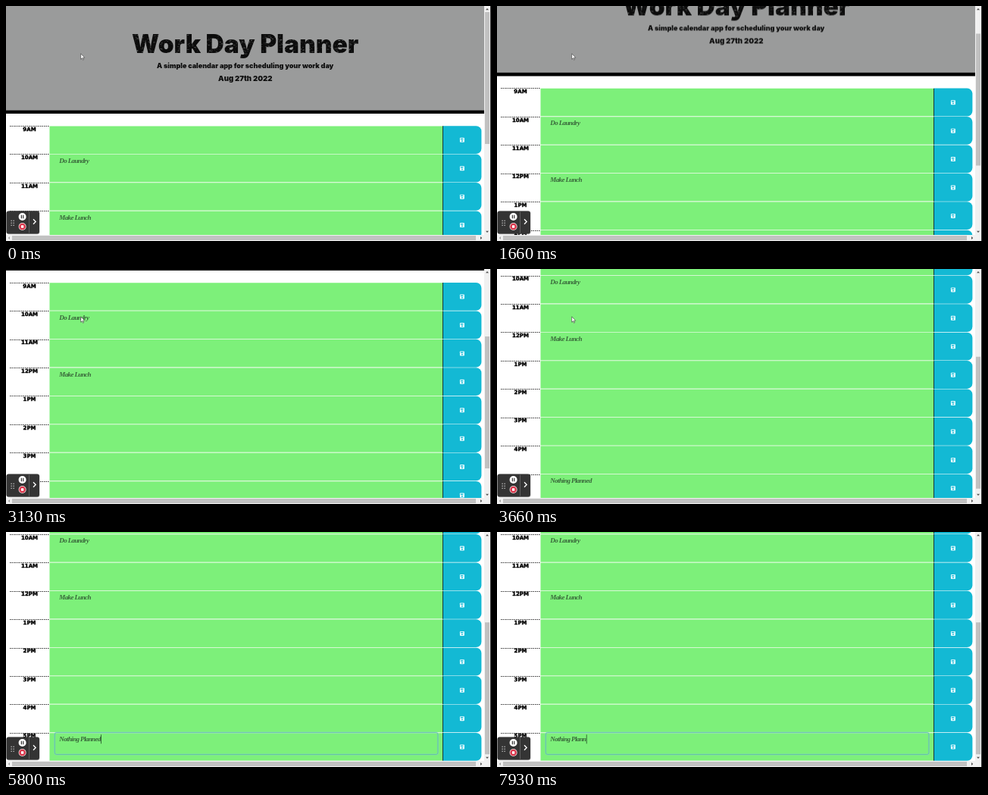
These frames come from a looping animation (640 by 310 pixels, 8000 ms). An HTML page with a canvas:

```html
<!DOCTYPE html>
<html lang="en">
<head>
<meta charset="utf-8">
<title>Day planner</title>
<style>
html, body { margin: 0; width: 100%; height: 100%; overflow: hidden; background: #fff; }
canvas { display: block; width: 640px; height: 310px; }
</style>
</head>
<body>
<canvas id="stage"></canvas>
<script>
const W = 640, H = 310, LOOP = 8000;
const VIEW_W = 631, VIEW_H = 302;
const ROW_TOP = 158, ROW_H = 37.42, MAX_SCROLL = 192.6;
const HOURS = ['9AM', '10AM', '11AM', '12PM', '1PM', '2PM', '3PM', '4PM', '5PM'];
const HEAVY = '900 SIZEpx Inter, Roboto, sans-serif';
const SCRIPT = 'italic bold 9px "Liberation Serif", "Noto Serif", serif';

const scale = Math.max(1, window.devicePixelRatio || 1);
const stage = document.getElementById('stage');
stage.width = W * scale;
stage.height = H * scale;
const ctx = stage.getContext('2d');

const clamp = x => Math.max(0, Math.min(1, x));
const smooth = x => x * x * (3 - 2 * x);
const ramp = (t, start, length) => smooth(clamp((t - start) / length));

// Wheel ticks: [start time, scroll offset after the tick]
const TICKS = [[425, 46.7], [1630, 93.6], [2240, 140.2], [3370, 186.8], [3800, MAX_SCROLL]];

function scrollAt(t) {
  let y = 0;
  for (const [start, end] of TICKS) y += (end - y) * ramp(t, start, 205);
  return y;
}

function box(x, y, w, h, color, radius = 0, c = ctx) {
  c.fillStyle = color;
  c.beginPath();
  c.roundRect(x, y, w, h, radius);
  c.fill();
}

function line(points, color, width = 1) {
  ctx.strokeStyle = color;
  ctx.lineWidth = width;
  ctx.beginPath();
  points.forEach(([x, y]) => ctx.lineTo(x, y));
  ctx.stroke();
}

function shape(points, color) {
  ctx.fillStyle = color;
  ctx.beginPath();
  points.forEach(([x, y]) => ctx.lineTo(x, y));
  ctx.fill();
}

function dot(x, y, r, color) {
  ctx.fillStyle = color;
  ctx.beginPath();
  ctx.arc(x, y, r, 0, Math.PI * 2);
  ctx.fill();
}

function seeded(seed) {
  return () => (seed = (seed * 16807) % 2147483647) / 2147483647;
}

// Heading letters with worn streaks, prepared once
function makeHeading() {
  const layer = document.createElement('canvas');
  layer.width = W * scale;
  layer.height = 120 * scale;
  const c = layer.getContext('2d');
  c.scale(scale, scale);
  c.textAlign = 'center';
  c.fillStyle = '#0c0c0c';
  const write = (text, size, y, spacing) => {
    c.font = HEAVY.replace('SIZE', size);
    c.letterSpacing = spacing + 'px';
    c.fillText(text, 315.7 + spacing / 2, y);
  };
  write('Work Day Planner', 33.5, 61.7, 0);
  write('A simple calendar app for scheduling your work day', 9, 82, 0);
  write('Aug 27th 2022', 9.6, 99, 0);

  c.globalCompositeOperation = 'source-atop';
  const rnd = seeded(71);
  for (let i = 0; i < 1100; i++) {
    const x = 160 + rnd() * 312, y = 36 + rnd() * 34;
    c.fillStyle = `rgba(150,152,151,${0.15 + rnd() * 0.5})`;
    c.fillRect(x, y, 0.5 + rnd() * 2.2, 0.3 + rnd() * 0.6);
  }
  for (let i = 0; i < 500; i++) {
    c.fillStyle = `rgba(150,152,151,${0.1 + rnd() * 0.35})`;
    c.fillRect(188 + rnd() * 256, 74 + rnd() * 28, 0.5 + rnd() * 1.5, 0.4);
  }
  return layer;
}
const heading = makeHeading();

function drawHeader(scroll) {
  box(0, -scroll, VIEW_W, 137.4, '#9a9b9b');
  box(0, 137.4 - scroll, VIEW_W, 4.7, '#000');
  ctx.drawImage(heading, 0, -scroll, W, 120);
}

function saveIcon(x, y) {
  box(x - 3, y - 3, 6, 6, '#e9fbff', 0.8);
  box(x - 2, y - 2, 3.4, 1.4, '#13b9d4');
  dot(x, y + 1.2, 0.95, '#13b9d4');
}

function drawRow(hour, i, y) {
  box(57.5, y + 0.4, 519, ROW_H - 0.9, '#7df07a');
  box(57.5, y + ROW_H - 0.5, 519, 0.9, '#d5f8d3');
  box(576.8, y + 0.2, 50.6, ROW_H - 0.6, '#13b9d4', [0, 7, 7, 0]);
  box(576, y + 0.3, 1, ROW_H - 0.7, '#17343a');
  saveIcon(601.9, y + 18.8);

  ctx.setLineDash([1.5, 1]);
  const edge = Math.round(y) + 0.5;
  line([[5, edge], [57.5, edge]], '#222', 0.9);
  ctx.setLineDash([]);

  ctx.font = 'bold 7px "DejaVu Sans", sans-serif';
  ctx.textAlign = 'center';
  ctx.fillStyle = ctx.strokeStyle = '#000';
  ctx.lineWidth = 0.4;
  ctx.fillText(hour, 31, y + 6.7);
  ctx.strokeText(hour, 31, y + 6.7);
}

function drawNote(text, y) {
  ctx.font = SCRIPT;
  ctx.textAlign = 'left';
  ctx.letterSpacing = '-0.62px';
  ctx.fillStyle = '#38663a';
  ctx.fillText(text, 70.3, y + 11.6);
  const width = ctx.measureText(text).width;
  ctx.letterSpacing = '0px';
  return width;
}

const FOCUS = 5600;

function drawPlanner(t, scroll) {
  const top = i => ROW_TOP + i * ROW_H - scroll;
  HOURS.forEach((hour, i) => drawRow(hour, i, top(i)));
  drawNote('Do Laundry', top(1));
  drawNote('Make Lunch', top(3));

  const removed = t < 7660 ? 0 : t < 7860 ? 1 : 2;
  const note = 'Nothing Planned';
  const y = top(8);
  if (t >= FOCUS) {
    ctx.strokeStyle = 'rgba(125,205,225,0.45)';
    ctx.lineWidth = 2;
    ctx.beginPath();
    ctx.roundRect(64.3, y - 0.2, 505.6, 28.9, 2.5);
    ctx.stroke();
    ctx.strokeStyle = '#62b9a8';
    ctx.lineWidth = 0.8;
    ctx.stroke();
  }
  const width = drawNote(note.slice(0, note.length - removed), y);
  const blinkOff = t > 6860 && t < 7260;
  if (t >= FOCUS && !blinkOff) box(70.6 + width, y + 2.6, 0.8, 12, '#234d28');
}

function drawScrollbars(scroll) {
  const gray = '#505050', thumb = '#c1c1c1';
  box(VIEW_W, 0, 8, H, '#f1f1f1');
  box(0, VIEW_H, 639, 8, '#f1f1f1');
  box(632, 8 + scroll * 0.577, 6, 174, thumb);
  box(8, 303, 612, 6, thumb);
  shape([[633, 5.2], [635, 3], [637, 5.2]], gray);
  shape([[633, 296.7], [635, 298.9], [637, 296.7]], gray);
  shape([[5, 304], [2.8, 306], [5, 308]], '#a3a3a3');
  shape([[626, 304], [628.2, 306], [626, 308]], gray);
  box(639, 0, 1, H, '#2b2b2b');
}

function drawRecorder() {
  box(0.5, 270.6, 44, 30.6, 'rgba(0,0,0,0.25)', 3);
  box(0.5, 270.6, 43.5, 29.8, '#343434', 3);
  for (let i = 0; i < 6; i++) {
    dot(7.1 + (i % 2) * 3, 283.3 + (i >> 1) * 3, 0.75, '#d0d0d0');
  }
  dot(21.6, 278, 5, '#fff');
  box(19.8, 275.8, 1.2, 4.4, '#333');
  box(22.2, 275.8, 1.2, 4.4, '#333');
  dot(21.6, 291, 5, '#f3e3e3');
  dot(21.6, 291, 4.3, '#d9344a');
  box(19.9, 289.3, 3.4, 3.4, '#fff', 0.5);
  box(30.2, 271.5, 0.8, 28, '#6a6a6a');
  line([[36, 281.2], [39.2, 284.5], [36, 287.8]], '#fff', 1.3);
}

function drawPointer(t) {
  if (t >= FOCUS) return;
  const move = ramp(t, 4150, 600);
  ctx.save();
  ctx.translate(98.7 + 48 * move, 62.8 + 211.2 * move);
  const arrow = [[0, 0], [0, 7.4], [1.7, 5.9], [2.8, 8.4], [3.9, 7.9], [2.8, 5.5], [5, 5.4], [0, 0]];
  shape(arrow, '#fff');
  line(arrow, '#333', 0.6);
  ctx.restore();
}

function draw(t) {
  const scroll = scrollAt(t);
  ctx.setTransform(scale, 0, 0, scale, 0, 0);
  box(0, 0, W, H, '#fff');
  drawHeader(scroll);
  drawPlanner(t, scroll);
  drawScrollbars(scroll);
  drawRecorder();
  drawPointer(t);
}

const begin = performance.now();
function tick() {
  draw((performance.now() - begin) % LOOP);
  requestAnimationFrame(tick);
}
tick();
</script>
</body>
</html>
```
